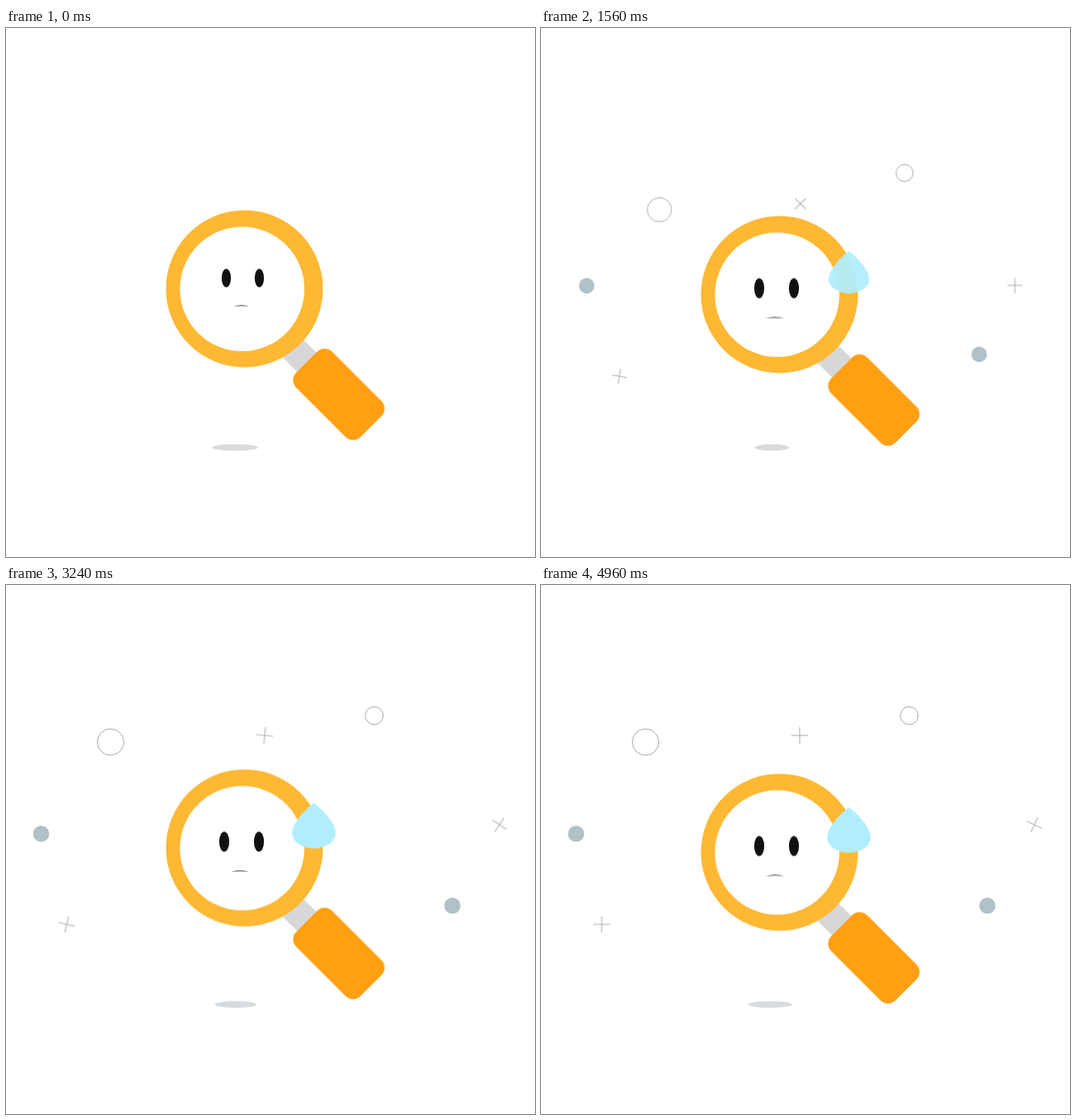
Animation, 640 px wide and 640 px high, one loop 5 s. Source, as an HTML page:

```html
<!DOCTYPE html>
<html lang="en">
<head>
<meta charset="utf-8">
<title>Magnifier</title>
<style>
html, body { margin: 0; width: 100%; height: 100%; overflow: hidden; background: #fff; }
svg { display: block; width: 100vw; height: 100vh; }

.move { animation: 5s cubic-bezier(.37, 0, .63, 1) infinite; }
.bob { animation-name: bob; }
.shadow { animation-name: shadow; transform-origin: 277px 507.5px; }
.far { animation-name: far; transform-origin: 322px 538px; }
.near { animation-name: near; transform-origin: 322px 538px; }
.eye-l { animation-name: eye-l; transform-origin: 266.5px 302.5px; }
.eye-r { animation-name: eye-r; transform-origin: 306.5px 302.5px; }
.mouth { animation-name: mouth; transform-origin: 285px 336.5px; }
.drop { animation-name: drop; }
.spin { animation-timing-function: linear; }
.spin-top { animation-name: spin-top; }
.spin-left { animation-name: spin-left; }
.spin-right { animation-name: spin-right; }

.line { fill: none; stroke: #a9a9ac; stroke-width: 1; }
.line * { vector-effect: non-scaling-stroke; }
.dot { fill: #b0c1c7; }

@keyframes bob {
  0%, 22.6%, 45.6%, 69.6%, 92.4% { transform: none; }
  11.4%, 34%, 57.2%, 81.6% { transform: translateY(8px); }
  99.2%, 100% { transform: translateY(7.8px); }
}
@keyframes shadow {
  0%, 22.6%, 45.6%, 69.6%, 93.6% { transform: translateX(0) scaleX(1); }
  11.4%, 34%, 57.2%, 81.6% { transform: translateX(2.8px) scaleX(.7); }
  99.2%, 100% { transform: translateX(.2px) scaleX(.965); }
}
@keyframes far {
  0%, 7.2% { transform: scale(0); }
  14.4% { transform: scale(1.1); }
  28% { transform: scale(.908); }
  47.2%, 100% { transform: scale(1); }
}
@keyframes near {
  0%, 6.4% { transform: scale(0); }
  14.4% { transform: scale(1.1); }
  28% { transform: scale(.951); }
  47.2%, 100% { transform: scale(1); }
}
@keyframes eye-l {
  0%, 14.4% { transform: none; }
  26.4%, 100% { transform: translate(-2.5px, 5.5px) scale(1.08); }
}
@keyframes eye-r {
  0%, 14.4% { transform: none; }
  26.4%, 100% { transform: translate(-.5px, 5.5px) scale(1.08); }
}
@keyframes mouth {
  0%, 14.4% { transform: none; }
  26.4%, 100% { transform: translate(-2px, 7.5px) scaleX(1.27); }
}
@keyframes drop {
  0%, 23.2% { transform: scale(0); opacity: 0; }
  32.8%, 100% { transform: none; opacity: 1; }
}
@keyframes spin-top {
  0%, 18.4% { transform: rotate(0deg); }
  31.2% { transform: rotate(45deg); }
  43.2% { transform: rotate(20deg); }
  53.6% { transform: rotate(-10deg); }
  76% { transform: rotate(20deg); }
  99.2%, 100% { transform: rotate(0deg); }
}
@keyframes spin-left {
  0%, 18.4% { transform: rotate(35deg); }
  31.2% { transform: rotate(10deg); }
  43.2% { transform: rotate(-25deg); }
  53.6% { transform: rotate(15deg); }
  76% { transform: rotate(12deg); }
  99.2%, 100% { transform: rotate(0deg); }
}
@keyframes spin-right {
  0%, 18.4% { transform: rotate(45deg); }
  31.2% { transform: rotate(0deg); }
  43.2% { transform: rotate(32deg); }
  53.6% { transform: rotate(25deg); }
  76% { transform: rotate(42deg); }
  99.2%, 100% { transform: rotate(25deg); }
}
</style>
</head>
<body>
<svg viewBox="0 0 640 640">
  <ellipse class="move shadow" cx="277" cy="507.5" rx="28" ry="4" fill="#d7dbde"/>

  <g class="move far line">
    <circle cx="126.5" cy="190" r="16"/>
    <g transform="translate(313 182)"><path class="move spin spin-top" d="M-10 0H10M0-10V10"/></g>
    <g transform="translate(73.5 410.5)"><path class="move spin spin-left" d="M-10 0H10M0-10V10"/></g>
    <g transform="translate(597 290)"><path class="move spin spin-right" d="M-10 0H10M0-10V10"/></g>
  </g>
  <g class="move near">
    <g class="line"><circle cx="445.5" cy="158" r="10.8"/></g>
    <circle class="dot" cx="42.5" cy="301" r="9.8"/>
    <circle class="dot" cx="540" cy="388" r="9.8"/>
  </g>

  <g class="move bob">
    <g transform="translate(402.7 443.2) rotate(45)">
      <rect x="-90" y="-16.5" width="50" height="33" fill="#d7d7d9"/>
      <rect x="-55" y="-30.7" width="110" height="61.4" rx="13" fill="#ff9f12"/>
    </g>
    <circle cx="288.5" cy="315.5" r="95" fill="#ffb833"/>
    <circle cx="285.7" cy="315.8" r="75.3" fill="#fff"/>
    <ellipse class="move eye-l" cx="266.5" cy="302.5" rx="5.6" ry="11.2" fill="#111"/>
    <ellipse class="move eye-r" cx="306.5" cy="302.5" rx="5.6" ry="11.2" fill="#111"/>
    <path class="move mouth" d="M276 337.3Q285 333 294 337.3Q285 335.2 276 337.3Z" fill="#333"/>
    <g transform="translate(372.5 288.5)">
      <path class="move drop" d="M0-27.5C10-20 26.3-3 26.3 9C26.3 20 14 27.5 0 27.5S-26.3 20-26.3 9C-26.3-3-10-20 0-27.5Z" fill="#b0eeff"/>
    </g>
  </g>
</svg>
</body>
</html>
```
